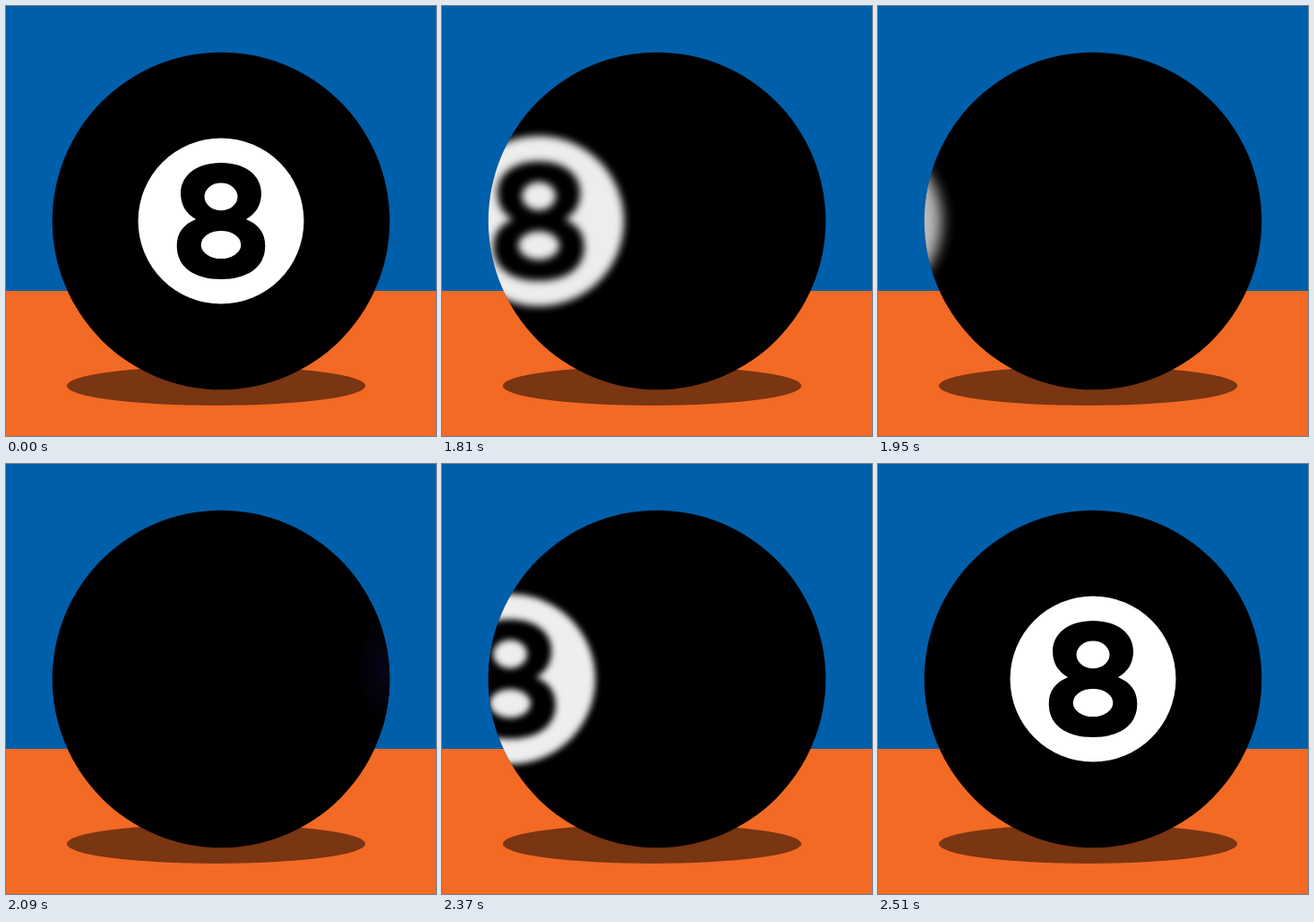
These frames come from a looping animation (480 px wide and 480 px high, 2.58 s). An HTML page:

```html
<!DOCTYPE html>
<html lang="en">
<head>
<meta charset="utf-8">
<title>Eight ball</title>
<style>
  html, body { margin: 0; width: 100%; height: 100%; overflow: hidden; background: #005faa; }
  svg { display: block; width: 100vw; height: 100vh; }
  #spot { transform-origin: 240px 240px; }
</style>
</head>
<body>
<svg viewBox="0 0 480 480">
  <defs>
    <clipPath id="ball"><circle cx="240" cy="240" r="188.3"/></clipPath>
    <radialGradient id="glow">
      <stop offset="0" stop-color="#07071f"/>
      <stop offset="1" stop-color="#000"/>
    </radialGradient>
  </defs>
  <rect width="480" height="480" fill="#005faa"/>
  <rect y="318" width="480" height="162" fill="#f26a24"/>
  <ellipse cx="234.5" cy="424" rx="166.7" ry="22" fill="#7a3512"/>
  <circle cx="240" cy="240" r="188.3"/>
  <g clip-path="url(#ball)">
    <ellipse id="patch" cx="436" cy="228" rx="50" ry="68" fill="url(#glow)"/>
    <g id="spot">
      <circle cx="240" cy="240" r="92.5" fill="#fff"/>
      <path d="M240 175C267 175 285 189 285 209C285 222 279 232 268 238
        C282 244 289.3 253 289.3 268C289.3 292 269 305 240 305
        C211 305 190.7 292 190.7 268C190.7 253 198 244 212 238
        C201 232 195 222 195 209C195 189 213 175 240 175Z"/>
      <ellipse cx="240" cy="212.8" rx="18.5" ry="15.4" fill="#fff"/>
      <ellipse cx="240" cy="266.5" rx="22.3" ry="15.6" fill="#fff"/>
    </g>
  </g>
</svg>
<script>
  const LOOP = 2580, START = 1740, STEP = 70, STEPS = 12, TURN = 6;

  // Look of the spot after n steps away from the centre.
  const look = (n, speed, blur, opacity) => ({
    transform: `translateX(${-n * speed}px) scale(${n ? 1.027 : 1})`,
    filter: `blur(${n * blur}px)`,
    opacity: Math.max(0, opacity)
  });
  const rollOut = n => look(n, 66, 2, 1 - .0167 * n ** 2);
  const rollBack = n => look(n, 82, 1.75, 1 - .008 * n ** 3);

  const spotAt = i => i <= TURN ? rollOut(i) : rollBack(STEPS - i);
  const patchAt = i => ({ opacity: i === TURN || i === TURN + 1 ? 1 : 0 });

  // Each pose holds until the next step.
  function play(id, poseAt) {
    const frames = [];
    for (let i = 0; i <= STEPS; i++) {
      const at = i ? START + (i - 1) * STEP : 0;
      frames.push({ offset: at / LOOP, easing: 'steps(1, end)', ...poseAt(i) });
    }
    frames.push({ offset: 1, ...poseAt(STEPS) });
    document.getElementById(id).animate(frames, { duration: LOOP, iterations: Infinity });
  }

  play('spot', spotAt);
  play('patch', patchAt);
</script>
</body>
</html>
```
